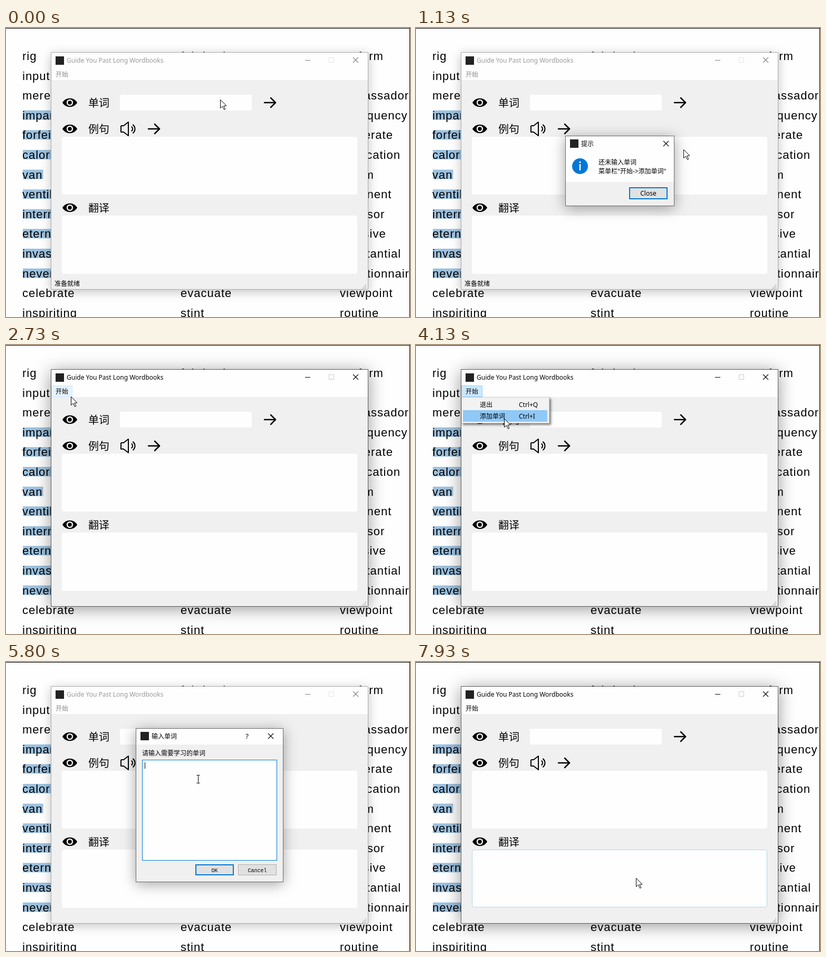
Animation, 766 px wide and 550 px high, one loop 8 s. Source, as an HTML page with a canvas:

```html
<!DOCTYPE html>
<html lang="zh">
<head>
<meta charset="utf-8">
<title>Vocabulary helper</title>
<style>
  html, body { margin: 0; width: 100%; height: 100%; overflow: hidden; background: #fefefe; }
  canvas { display: block; }
</style>
</head>
<body>
<canvas id="stage" width="766" height="550"></canvas>
<script>
const ctx = document.getElementById('stage').getContext('2d');
const LOOP = 8000;
const PAPER = '#fefefe', BODY = '#f0f0f0', BLUE = '#0078d7', INK = '#000', ICON = '#222';
const UI = '"Noto Sans", "Noto Sans CJK SC", "Noto Sans CJK", sans-serif';
const CJK = '"Noto Sans CJK SC", "Noto Sans CJK", sans-serif';
const MONO = '"Liberation Mono", monospace';
const APP = 'Guide You Past Long Wordbooks';

const T = {
  tipOpen: 600, tipClose: 1730, menuHover: 2670, menuOpen: 3400,
  formOpen: 4670, caretOff: 5270, nudge: 5600, caretOn: 5800,
  paste: 6270, formClose: 7670
};

// Pointer stops: time, x, y
const path = [
  [0, 406, 136], [460, 500, 142], [670, 500, 142], [1120, 507, 231],
  [1560, 440, 316], [1800, 440, 316], [2670, 123, 98], [3450, 123, 98],
  [4100, 167, 140], [4670, 167, 140], [5380, 364, 223], [6600, 364, 223],
  [7380, 417, 411], [LOOP, 417, 411]
];

const studied = ['impart', 'forfeit', 'calorie', 'van', 'ventilation',
  'intermediate', 'eternal', 'invasion', 'nevertheless'];
const left = ['rig', 'input', 'merely', ...studied, 'celebrate', 'inspiriting'];
const right = ['perform', '', 'ambassador', 'delinquency', 'moderate', 'implication',
  'steam', 'continent', 'sponsor', 'massive', 'substantial', 'questionnaire',
  'viewpoint', 'routine'];

const clamp = v => Math.max(0, Math.min(1, v));
const smooth = v => v * v * (3 - 2 * v);
const within = (p, x, y, w, h) => p.x >= x && p.x < x + w && p.y >= y && p.y < y + h;

function pointer(t) {
  const i = Math.max(1, path.findIndex(s => s[0] > t));
  const [t0, x0, y0] = path[i - 1], [t1, x1, y1] = path[i];
  const k = smooth(clamp((t - t0) / (t1 - t0)));
  return { x: Math.round(x0 + (x1 - x0) * k), y: Math.round(y0 + (y1 - y0) * k) };
}

function box(x, y, w, h, fill) {
  ctx.fillStyle = fill;
  ctx.fillRect(x, y, w, h);
}

function frame(x, y, w, h, color, line = 1) {
  ctx.strokeStyle = color;
  ctx.lineWidth = line;
  ctx.strokeRect(x + line / 2, y + line / 2, w - line, h - line);
}

function rounded(x, y, w, h, r, fill, edge) {
  ctx.beginPath();
  ctx.roundRect(x, y, w, h, r);
  ctx.fillStyle = fill;
  ctx.fill();
  if (edge) { ctx.strokeStyle = edge; ctx.lineWidth = 1; ctx.stroke(); }
}

function text(s, x, y, size, family = CJK, color = INK, align = 'left') {
  ctx.font = `${size}px ${family}`;
  ctx.textAlign = align;
  ctx.fillStyle = color;
  ctx.fillText(s, x, y);
}

// Polyline from flat coordinates
function line(points, color, width) {
  ctx.beginPath();
  for (let i = 0; i < points.length; i += 2) ctx.lineTo(points[i], points[i + 1]);
  ctx.strokeStyle = color;
  ctx.lineWidth = width;
  ctx.stroke();
}

function cross(x, y, color) {
  line([x, y, x + 10, y + 10], color, 1.1);
  line([x + 10, y, x, y + 10], color, 1.1);
}

function panel(x, y, w, h, edge, shade, blur) {
  ctx.save();
  ctx.shadowColor = `rgba(0,0,0,${shade})`;
  ctx.shadowBlur = blur;
  ctx.shadowOffsetY = 4;
  box(x, y, w, h, BODY);
  ctx.restore();
  frame(x, y, w, h, edge);
}

function page() {
  box(0, 0, 766, 550, PAPER);
  ctx.letterSpacing = '1px';
  const family = '"Liberation Sans", sans-serif';
  left.forEach((word, i) => {
    const y = 61 + i * 37.6;
    if (studied.includes(word)) {
      ctx.font = `22px ${family}`;
      box(32, y - 17, ctx.measureText(word).width, 18, '#9cc1df');
    }
    text(word, 31, y, 22, family);
  });
  text('fabrication', 331, 61, 22, family);
  text('evacuate', 331, 512.2, 22, family);
  text('stint', 331, 549.8, 22, family);
  right.forEach((word, i) => text(word, 633, 61 + i * 37.6, 22, family));
  ctx.letterSpacing = '0px';
  box(0, 0, 766, 1, INK);
  box(765, 0, 1, 550, INK);
}

function eye(y) {
  const x = 121;
  ctx.beginPath();
  ctx.moveTo(x - 14, y);
  ctx.bezierCurveTo(x - 8, y - 11, x + 8, y - 11, x + 14, y);
  ctx.bezierCurveTo(x + 8, y + 11, x - 8, y + 11, x - 14, y);
  ctx.fillStyle = INK;
  ctx.fill();
  [[6.2, BODY], [3.7, INK]].forEach(([r, fill]) => {
    ctx.beginPath();
    ctx.arc(x, y, r, 0, 7);
    ctx.fillStyle = fill;
    ctx.fill();
  });
}

function arrow(x, y) {
  ctx.lineCap = ctx.lineJoin = 'round';
  line([x, y, x + 21, y], INK, 2.5);
  line([x + 12, y - 9, x + 21, y, x + 12, y + 9], INK, 2.5);
  ctx.lineCap = 'butt';
  ctx.lineJoin = 'miter';
}

function speaker() {
  ctx.lineJoin = 'round';
  line([218, 186, 223, 186, 232, 179, 232, 205, 223, 198, 218, 198, 218, 186], INK, 2);
  ctx.lineJoin = 'miter';
  [5.5, 10].forEach(r => {
    ctx.beginPath();
    ctx.arc(234.5, 192, r, -0.95, 0.95);
    ctx.stroke();
  });
}

function mainWindow(t, active) {
  panel(85, 46, 602, 452, active ? '#5a5a5a' : '#aaa', active ? 0.4 : 0.24, active ? 30 : 18);
  box(86, 47, 600, 52, PAPER);
  const ink = active ? INK : '#999';
  box(94, 54, 16, 16, ICON);
  text(APP, 115, 66, 12, UI, ink);

  if (t >= T.menuHover && t < T.formOpen) {
    const opened = t >= T.menuOpen;
    box(86, 77, 40, 22, opened ? '#cce8ff' : '#e5f3ff');
    frame(86, 77, 40, 22, opened ? '#99d1ff' : '#cce8ff');
  }
  text('开始', 94, 93, 12, CJK, active ? INK : '#8a8a8a');

  const tool = active ? INK : '#808080';
  line([567, 61.5, 577, 61.5], tool, 1);
  frame(612, 56, 10, 10, active ? '#ccc' : '#e4e4e4');
  cross(658, 56, tool);

  [[142, '单词'], [192, '例句'], [342, '翻译']].forEach(([y, label]) => {
    eye(y);
    text(label, 156, y + 8, 20);
  });
  rounded(216, 127, 250, 30, 3, PAPER);
  arrow(490, 142);
  speaker();
  arrow(270, 192);
  rounded(106, 207, 560, 110, 4, PAPER);
  if (t >= T.formClose) rounded(106.5, 357.5, 559, 109, 4, PAPER, '#add8e6');
  else rounded(106, 357, 560, 111, 4, PAPER);
  if (t < T.menuHover) text('准备就绪', 92, 491, 12);

  for (let i = 0; i < 3; i++)
    for (let j = 0; j <= i; j++) box(681 - j * 3, 488 + i * 3, 2, 2, '#bfbfbf');
}

function menu(p) {
  ctx.save();
  ctx.shadowColor = 'rgba(0,0,0,.5)';
  ctx.shadowBlur = 4;
  ctx.shadowOffsetX = ctx.shadowOffsetY = 3;
  box(86, 99, 167, 50, '#f2f2f2');
  ctx.restore();
  frame(86, 99, 167, 50, '#ccc');
  [['退出', 'Ctrl+Q'], ['添加单词', 'Ctrl+I']].forEach(([label, key], i) => {
    const y = 102 + i * 22;
    if (within(p, 89, y, 160, 22)) box(89, y, 160, 22, '#90c8f6');
    text(label, 121, y + 16, 12);
    text(key, 195, y + 16, 12, UI);
  });
}

function button(label, x, y, w, h, family, size, main, hover) {
  box(x, y, w, h, hover ? '#e5f1fb' : '#e1e1e1');
  frame(x, y, w, h, main ? BLUE : '#adadad', main && !hover ? 2 : 1);
  text(label, x + w / 2, y + h / 2 + 4, size, family, INK, 'center');
}

function dialogBase(x, y, w, h, white, title) {
  panel(x, y, w, h, '#6a6a6a', 0.36, 24);
  box(x + 1, y + 1, w - 2, white, PAPER);
  box(x + 9, y + 7, 16, 16, ICON);
  text(title, x + 30, y + 20, 12);
}

function tipDialog(t, p) {
  dialogBase(283, 205, 207, 134, 87, '提示');
  cross(469, 215, INK);
  ctx.beginPath();
  ctx.arc(311, 263, 15, 0, 7);
  ctx.fillStyle = BLUE;
  ctx.fill();
  box(309.8, 259, 2.4, 12, PAPER);
  box(309.6, 254, 2.8, 2.8, PAPER);
  text('还未输入单词', 346, 260, 12);
  text('菜单栏"开始->添加单词"', 346, 277, 12, UI);
  button('Close', 404, 303, 73, 23, UI, 12, true, within(p, 404, 303, 73, 23));
}

function formDialog(t, p) {
  dialogBase(246, 126, 280, 293, 30, '输入单词');
  text('?', 457, 146, 13, UI, INK, 'center');
  cross(497, 136, INK);
  text('请输入需要学习的单词', 258, 178, 12);
  box(258, 186, 256, 192, PAPER);
  frame(258, 186, 256, 192, BLUE);

  const pasted = t >= T.paste;
  if (pasted) studied.forEach((word, i) => text(word, 263, 201 + i * 14, 10, MONO));
  const caret = pasted ? Math.floor((t - T.paste) / 530) % 2 === 0
    : t < T.caretOff || t >= T.caretOn;
  if (caret) box(pasted ? 335 : 263, pasted ? 303 : 191, 1, 12, INK);

  button('OK', 359, 385, 73, 21, MONO, 10, true, t > 6600 && p.y >= 385);
  button('Cancel', 440, 385, 73, 21, MONO, 10, false, false);
}

// Fades and grows a dialog about its centre
function popup(draw, t, p, open, close, cx, cy) {
  const k = smooth(clamp((t - open) / 180)) * (1 - smooth(clamp((t - close) / 150)));
  if (k <= 0) return;
  const s = 0.92 + 0.08 * k;
  ctx.save();
  ctx.globalAlpha = k;
  ctx.translate(cx, cy);
  ctx.scale(s, s);
  ctx.translate(-cx, -cy);
  draw(t, p);
  ctx.restore();
}

function cursor(t, p) {
  const typing = t >= T.formOpen && t < T.formClose && within(p, 258, 186, 256, 192);
  if (typing) {
    const x = p.x + 0.5, y = p.y - (t < T.nudge ? 1 : 0);
    line([x, y - 8, x, y + 8], INK, 1);
    [-7.5, 7.5].forEach(d => {
      line([x - 3, y + d, x - 0.5, y + d], INK, 1);
      line([x + 0.5, y + d, x + 3, y + d], INK, 1);
    });
    return;
  }
  const shape = [0, 0, 0, 16, 4, 12.5, 7, 19, 9.3, 18, 6.4, 11.7, 11.5, 11.5];
  ctx.beginPath();
  for (let i = 0; i < shape.length; i += 2)
    ctx.lineTo(p.x + 0.5 + shape[i], p.y + 0.5 + shape[i + 1]);
  ctx.closePath();
  ctx.fillStyle = '#fff';
  ctx.fill();
  ctx.strokeStyle = INK;
  ctx.lineWidth = 1;
  ctx.stroke();
}

function render(t) {
  const p = pointer(t);
  const active = (t >= T.menuHover && t < T.formOpen) || t >= T.formClose;
  page();
  mainWindow(t, active);
  if (t >= T.menuOpen && t < T.formOpen) menu(p);
  popup(tipDialog, t, p, T.tipOpen, T.tipClose, 386.5, 272);
  popup(formDialog, t, p, T.formOpen, T.formClose, 386, 272.5);
  cursor(t, p);
}

const start = performance.now();
function tick() {
  render((performance.now() - start) % LOOP);
  requestAnimationFrame(tick);
}
tick();
</script>
</body>
</html>
```
